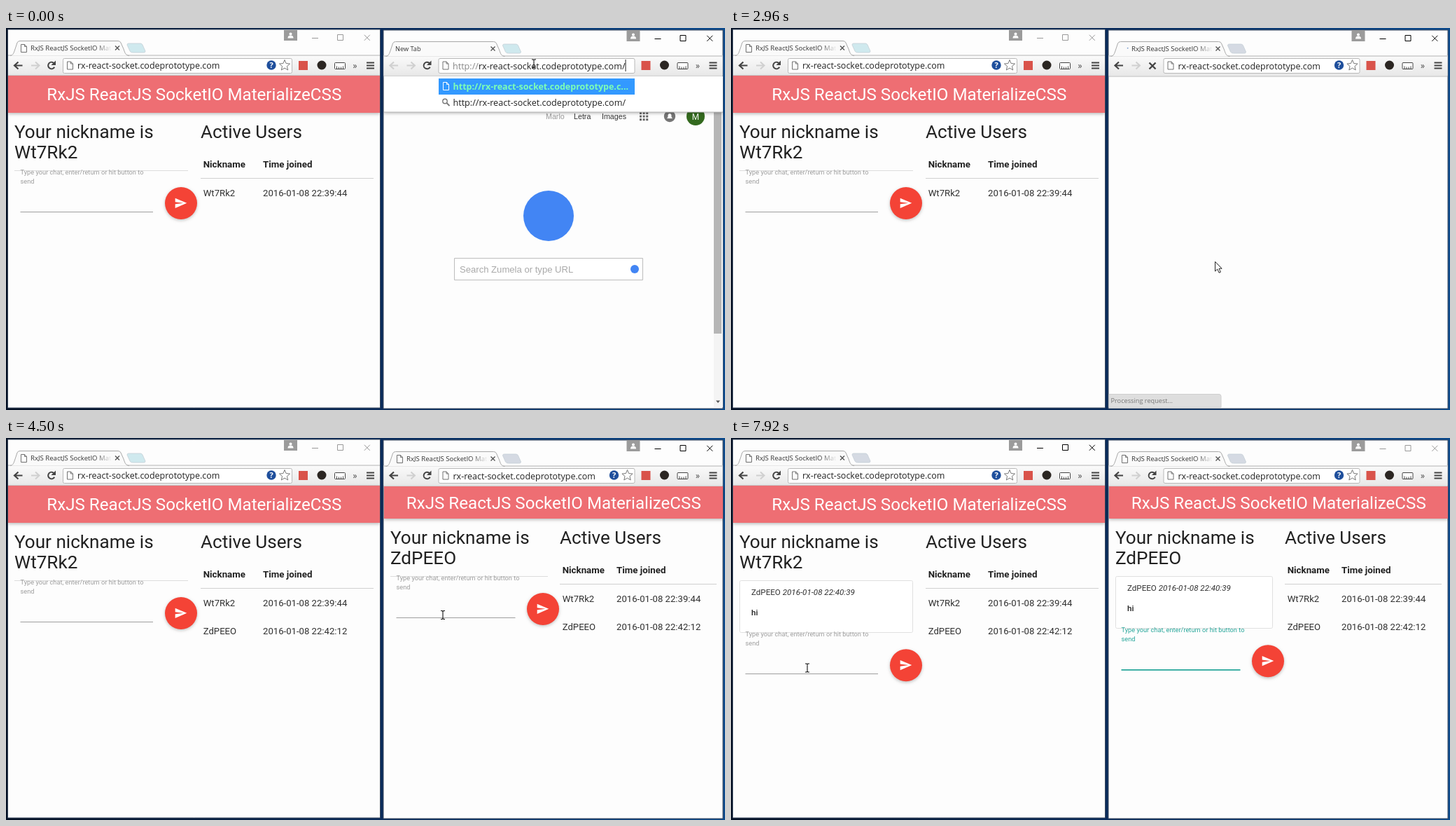
An HTML page with a canvas for the animation above (8 s loop, 1027 by 545 pixels).

```html
<!DOCTYPE html>
<html lang="en">
<head>
<meta charset="utf-8">
<title>Two browser windows sharing a chat</title>
<style>
html, body { margin: 0; width: 100%; height: 100%; overflow: hidden; background: #0a1f40; }
canvas { display: block; }
</style>
</head>
<body>
<canvas id="stage" width="1027" height="545"></canvas>
<script>
const g = document.getElementById('stage').getContext('2d');
const LOOP = 8000;
const INK = '#212121', SOFT_INK = '#303030', TEAL = [38, 166, 154], GREY = [158, 158, 158];
const HOST = 'rx-react-socket.codeprototype.com';
const APP = 'RxJS ReactJS SocketIO MaterializeCSS';
const FIRST = 'Wt7Rk2', SECOND = 'ZdPEEO';
const roboto = (size, style = '') => `${style} ${size}px Roboto, sans-serif`;
const ui = (size, style = '') => `${style} ${size}px "Open Sans", sans-serif`;
const arial = size => `${size}px "Liberation Sans", Arial, sans-serif`;

const bursts = [[250, 1200, 8], [1320, 2260, 8], [2380, 3380, 8], [3500, 3920, 4], [4200, 4770, 5],
  [5050, 5570, 4], [6130, 6280, 2], [6840, 7100, 3], [7400, 7920, 5]];
// Pointer path: [time, x, y].
const path = [[0, 754, 51], [250, 754, 51], [1200, 747, 52], [1320, 746, 56], [1800, 720, 220],
  [2260, 695, 325], [2960, 691, 333], [3380, 691, 333], [3650, 664, 302], [3920, 645, 270],
  [4200, 638, 262], [4770, 610, 243], [5570, 609, 243], [6840, 609, 243], [6970, 608, 242],
  [7400, 608, 242], [7920, 109, 328], [8000, 109, 328]];

function holdTime(t) {
  let held = 0;
  for (const [start, end, count] of bursts) {
    if (t < start) break;
    const step = (end - start) / (count - 1);
    held = start + Math.min(count - 1, Math.floor((t - start) / step + 1e-6)) * step;
  }
  return held;
}

function pointerAt(t) {
  const i = Math.max(1, path.findIndex(p => p[0] > t));
  const [t0, x0, y0] = path[i - 1], [t1, x1, y1] = path[i];
  const k = (t - t0) / (t1 - t0);
  return [x0 + (x1 - x0) * k, y0 + (y1 - y0) * k];
}

function box(x, y, w, h, fill, stroke, radius = 0) {
  g.beginPath();
  g.roundRect(x, y, w, h, radius);
  if (fill) { g.fillStyle = fill; g.fill(); }
  if (stroke) { g.strokeStyle = stroke; g.lineWidth = 1; g.stroke(); }
}
function disc(x, y, r, fill) {
  g.beginPath();
  g.arc(x, y, r, 0, 7);
  g.fillStyle = fill;
  g.fill();
}
function arc(x, y, r, from, to, color, width) {
  g.beginPath();
  g.arc(x, y, r, from, to);
  g.strokeStyle = color;
  g.lineWidth = width;
  g.stroke();
}
// Draws SVG path data at an offset.
function shape(d, x, y, fill, stroke, width = 1, scale = 1) {
  const p = new Path2D(d);
  g.save();
  g.translate(x, y);
  g.scale(scale, scale);
  if (fill) { g.fillStyle = fill; g.fill(p); }
  if (stroke) { g.strokeStyle = stroke; g.lineWidth = width; g.stroke(p); }
  g.restore();
}
function text(s, x, y, font, color = INK, align = 'left') {
  g.font = font;
  g.fillStyle = color;
  g.textAlign = align;
  g.fillText(s, x, Math.round(y));
}
function vertical(y0, y1, a, b) {
  const fade = g.createLinearGradient(0, y0, 0, y1);
  fade.addColorStop(0, a);
  fade.addColorStop(1, b);
  return fade;
}
function shadowed(draw) {
  g.save();
  g.shadowColor = 'rgba(0,0,0,.24)';
  g.shadowBlur = 4;
  g.shadowOffsetY = 1.6;
  draw();
  g.restore();
}

const pageIcon = (x, y) =>
  shape('M.5 .5H5.5L8.5 3.5V11.5H.5ZM5.5 .5V3.5H8.5', x, y, '#fff', '#707070');

function tabTitle(s, x, y, end) {
  const fade = g.createLinearGradient(end - 24, 0, end, 0);
  fade.addColorStop(0, '#333');
  fade.addColorStop(1, 'rgba(51,51,51,0)');
  text(s, x, y, ui(9.6), fade);
}

function star(x, y) {
  g.beginPath();
  for (let i = 0; i < 10; i++) {
    const r = i % 2 ? 3.6 : 8, a = (i / 5 - .5) * Math.PI;
    g.lineTo(x + r * Math.cos(a), y + r * Math.sin(a));
  }
  g.closePath();
  g.fillStyle = '#fff';
  g.fill();
  g.strokeStyle = '#777';
  g.lineWidth = 1;
  g.stroke();
}

// dx shifts items on the left edge, rx those on the right edge, dy the tab strip.
function browserFrame({ dx, rx, dy, active, plusColor, canGoBack, loading }) {
  const left = 2.5 + dx, width = 532 + rx - dx;
  box(left, 2 + dy, width, 540, '#fdfdfd', '#3c4b60');
  box(left + .5, 39, width - 1, 29, vertical(40, 68, '#fafafa', '#e8e8e8'));
  box(left + .5, 38.5 + dy, width - 1, 1, '#b4b4b4');
  box(left + .5, 67.5 + dy, width - 1, 1, '#b4b4b4');
  shape('M6 21.5C10 21 11 18 13 12L16 3Q17 .5 20 .5H160Q163 .5 164 3L168 12C170 18 171 21 176 21.5',
    dx, 18 + dy, '#fafafa', '#a8a8a8');
  shape('M0 2Q0 0 2 0H19Q21 0 22 2L26 11Q26 13 24 13H8Q5 13 4 11Z', 173 + dx, 22 + dy, plusColor, '#c5cfd6', .8);
  shape('M-3 -3L3 3M3 -3L-3 3', 159 + dx, 28.5 + dy, null, '#555', 1.4);

  box(397 + rx, 3, 19, 15 + dy, '#9b9b9b');
  disc(406.5 + rx, 8.5 + dy, 2, '#fff');
  shape('M-4 4Q-4 0 0 0Q4 0 4 4Z', 406.5 + rx, 10.5 + dy, '#fff');
  const control = active ? '#000' : '#999';
  box(437 + rx, 14 + dy, 9, 1, control);
  box(473.5 + rx, 9.5 + dy, 8, 8, null, control);
  shape('M-4 -4L4 4M4 -4L-4 4', 515.8 + rx, 13.8 + dy, null, control);

  const arrow = 'M6 -5L.5 0L6 5M1 0H12';
  shape(arrow, 11.5 + dx, 53.5, null, canGoBack ? '#444' : '#d0d0d0', 2.2);
  g.save();
  g.translate(48 + dx, 53.5);
  g.scale(-1, 1);
  shape(arrow, 0, 0, null, '#d0d0d0', 2);
  g.restore();
  if (loading) shape('M-4.5 -4.5L4.5 4.5M4.5 -4.5L-4.5 4.5', 65.5 + dx, 54, null, '#444', 2.4);
  else {
    arc(65 + dx, 53.5, 4.8, .5, 5.5, '#444', 2);
    shape('M6 -7V-.5H-.5Z', 65 + dx, 53.5, '#444');
  }
  box(81.5 + dx, 43.5, 327 + rx - dx, 21, '#fff', '#b8b8b8', 2);
  pageIcon(87 + dx, 47.5);

  box(418 + rx, 47, 13, 13, '#d9534a');
  disc(451 + rx, 53, 6.5, '#2b2622');
  box(469.5 + rx, 49.5, 15, 9, '#fff', '#444', 1);
  shape('M3 5V9M6 6V9M9 6V9M12 5V9', 469.5 + rx, 49.5, null, '#444');
  text('»', 498.5 + rx, 57.5, ui(12), '#444', 'center');
  for (const y of [48.5, 52.5, 56.5]) box(515 + rx, y, 11, 2, '#444');
}

function addressTools(rx, help) {
  star(398 + rx, 53.5);
  if (!help) return;
  disc(379 + rx, 53, 6.7, '#1f4f9c');
  text('?', 379 + rx, 57, ui(11, 'bold'), '#fff', 'center');
}

function newTabPage() {
  box(1011, 69, 13, 472, '#f4f4f4');
  box(1011, 83, 11, 353, '#b6b6b6');
  shape('M-3 2H3L0 -1.5Z', 1017, 76, '#555');
  shape('M-3 -1.5H3L0 2Z', 1017, 533, '#555');
  text('Marlo', 771, 129.5, arial(10.7), '#999');
  text('Letra', 811, 129.5, arial(10.7), '#333');
  text('Images', 851, 129.5, arial(10.7), '#333');
  for (let i = 0; i < 9; i++) box(905 + i % 3 * 4.6, 120 + Math.floor(i / 3) * 4.6, 3, 3, '#666');
  disc(948, 126, 8.2, '#757575');
  shape('M-4 3L-2.5 1V-1Q-2.5 -4 0 -4Q2.5 -4 2.5 -1V1L4 3Z', 948, 126, '#fff');
  disc(985, 126, 13, '#33691e');
  text('M', 985, 130.5, arial(12.5), '#fff', 'center');
  disc(775, 268, 36, '#4285f4');
  box(640.5, 328.5, 269, 31, '#fff', '#bdbdbd');
  text('Search Zumela or type URL', 648, 349, arial(13.1), '#a9a9a9');
  disc(898, 344, 6, '#4285f4');
}

function suggestions() {
  shadowed(() => box(540, 69, 484, 51, '#fff'));
  box(540, 119.5, 484, 1, '#b5b5b5');
  box(618, 72, 280, 23, '#3399ff');
  shape('M.5 .5H5.5L8.5 3.5V11.5H.5ZM5.5 .5V3.5H8.5', 624, 77, null, '#fff');
  text('http://rx-react-socket.codeprototype.c...', 638.5, 88, ui(12.5, 'bold'), '#7dffb4');
  arc(627, 104.5, 3.2, 0, 7, '#777', 1.4);
  shape('M0 0L4 4', 629.5, 107, null, '#777', 1.8);
  text(`http://${HOST}/`, 638.5, 111, ui(12.6), '#222');
}

function chatPage(p) {
  const { x, right, navTop, navHeight, dy, columnX, columnEnd, tableX, timeX, users, sent, body, focus } = p;
  const y = v => v + dy;
  const end = right - 9;
  shadowed(() => box(x, navTop, right - x, navHeight, '#ee6e73'));
  text(APP, (x + right) / 2 + .3, navTop + navHeight / 2 + 8.7, roboto(24.15), '#fff', 'center');

  const heading = roboto(26.1);
  text('Your nickname is', columnX, y(157), heading);
  text(p.nickname, columnX, y(186), heading);
  text('Active Users', tableX, y(157), heading);
  text('Nickname', tableX + 3.7, y(198.5), roboto(13.3, 'bold'));
  text('Time joined', timeX, y(198.5), roboto(13.3, 'bold'));
  box(tableX, y(214), end - tableX, 1, '#d0d0d0');
  users.forEach(([name, time], i) => {
    text(name, tableX + 3.7, y(240 + 40 * i), roboto(13.15), SOFT_INK);
    text(time, timeX, y(240 + 40 * i), roboto(13.15), SOFT_INK);
  });

  const shift = sent ? 74.3 : 0;
  if (sent) {
    box(columnX + .5, y(203.5), columnEnd - columnX - 1, 74, '#fff', '#e0e0e0', 2);
    text(SECOND, columnX + 17, y(224), roboto(11.6), SOFT_INK);
    const nameWidth = g.measureText(SECOND + ' ').width;
    text('2016-01-08 22:40:39', columnX + 17 + nameWidth, y(224), roboto(11.6, 'italic'), SOFT_INK);
    if (body) text('hi', columnX + 17, y(253), roboto(11.6, '500'));
  } else box(columnX, y(203), columnEnd - columnX, 1, '#dcdcdc');

  const inputX = columnX + 8.5, buttonX = p.buttonX, buttonY = y(250 + shift);
  const label = `rgb(${GREY.map((c, i) => c + (TEAL[i] - c) * focus)})`;
  text('Type your chat, enter/return or hit button to', inputX, y(209 + shift), roboto(9.24), label);
  text('send', inputX, y(222 + shift), roboto(9.24), label);
  box(inputX, Math.round(y(262 + shift)), p.inputEnd - inputX, focus ? 1 + focus * .7 : 1, focus ? label : '#9e9e9e');
  if (p.typed) text(p.typed, inputX, y(248.5 + shift), roboto(11.6));
  if (p.caret) {
    g.font = roboto(11.6);
    box(inputX + g.measureText(p.typed).width, y(237 + shift), 1, 14, '#222');
  }
  shadowed(() => disc(buttonX, buttonY, 23, '#f44336'));
  shape('M2 21l21-9L2 3v7l15 2-15 2z', buttonX - 9.9, buttonY - 9.7, '#fff', null, 1, .79);
}

function pointer(t) {
  const [x, y] = pointerAt(t);
  const overInput = t >= 4480 && t < 6960 || t >= 7900;
  if (y < 66 || overInput)
    shape('M-3 -6H-1L0 -5L1 -6H3M0 -5V5M-3 6H-1L0 5L1 6H3', x, y, null, '#111', 1.1);
  else
    shape('M0 0V13.6L3.2 10.6L5.6 15.8L7.8 14.8L5.5 9.8H9.6Z', x + .5, y + .5, '#fff', '#222');
}

function rightBrowser(t, users, sent, body) {
  const dx = 536.5, rx = 489.5;
  const fresh = t < 250, loading = !fresh && t < 3370, titled = t >= 1980;
  browserFrame({
    dx, rx, dy: 1, active: t < 7900, plusColor: fresh ? '#cfe9ee' : '#d5dae3', canGoBack: !fresh, loading
  });

  if (fresh) {
    text('New Tab', 556, 33, ui(9.2), '#333');
    text('http://', 638, 58.5, ui(12.6), '#888');
    const start = 638 + g.measureText('http://').width;
    text(HOST + '/', start, 58.5, ui(12.6), '#222');
    box(start + g.measureText(HOST + '/').width, 45, 1, 17, '#222');
  } else {
    tabTitle(titled ? 'RxJS ReactJS SocketIO Mat' : 'rx-react-socket.codeprotot', 572, 33, 688);
    text(HOST, 638.5, 58.5, ui(12.5), '#222');
    addressTools(rx, titled);
    if (!loading) pageIcon(558, 24);
    else if (titled) {
      const from = -.4 + (t - 2951) / 160;
      arc(562, 30, 4.8, from, from + .25 + 2.6 * Math.abs(Math.sin((t - 2951) / 320)), '#5b86c4', 1.6);
    } else {
      const from = 1.2 - (t - 1200) / 180;
      arc(562, 30, 4.8, from, from + 2.2, '#999', 1.5);
    }
  }

  if (t < 510) newTabPage();
  if (fresh) suggestions();
  if (t >= 3230) chatPage({
    x: 540, right: 1024, navTop: 69, navHeight: 46, dy: -6, columnX: 549, columnEnd: 774, tableX: 791,
    timeX: users.length > 1 ? 872 : 899, inputEnd: 727.5, buttonX: 767, nickname: SECOND,
    users: users.length > 1 ? users : [], sent, body,
    focus: Math.min(1, Math.max(0, (t - 5100) / 400)),
    typed: t < 6120 || t >= 6840 ? '' : t < 6280 ? 'h' : 'hi',
    caret: t >= 6120 && t < 7400
  });
  if (t >= 1850 && t < 3500) {
    box(540, 522.5, 160, 18.5, '#dedede', '#cfcfcf', [0, 3, 0, 0]);
    text('Processing request...', 542.5, 535, ui(9.2), '#777');
  }
}

function leftBrowser(t, users, sent, body) {
  const active = t >= 7900;
  browserFrame({
    dx: 0, rx: 0, dy: 0, active, plusColor: active ? '#d5dae3' : '#cfe9ee', canGoBack: true, loading: false
  });
  pageIcon(21, 23);
  tabTitle('RxJS ReactJS SocketIO Mat', 35, 32, 151);
  text(HOST, 102, 57.8, ui(12.5), '#222');
  addressTools(0, true);
  chatPage({
    x: 3, right: 534, navTop: 68, navHeight: 53, dy: 0, columnX: 12, columnEnd: 260, tableX: 278,
    timeX: 367, inputEnd: 210, buttonX: 250, nickname: FIRST, users, sent, body,
    focus: 0, typed: '', caret: false
  });
}

function draw(t) {
  const desktop = g.createLinearGradient(0, 0, 1027, 0);
  desktop.addColorStop(0, '#041024');
  desktop.addColorStop(.5, '#0a2a58');
  desktop.addColorStop(1, '#0c4a8c');
  box(0, 0, 1027, 545, desktop);
  const users = [[FIRST, '2016-01-08 22:39:44']];
  if (t >= 4200) users.push([SECOND, '2016-01-08 22:42:12']);
  const sent = t >= 6960, body = t >= 7090;
  leftBrowser(t, users, sent, body);
  rightBrowser(t, users, sent, body);
  pointer(t);
}

function frame() {
  draw(holdTime(performance.now() % LOOP));
  requestAnimationFrame(frame);
}
frame();
</script>
</body>
</html>
```
